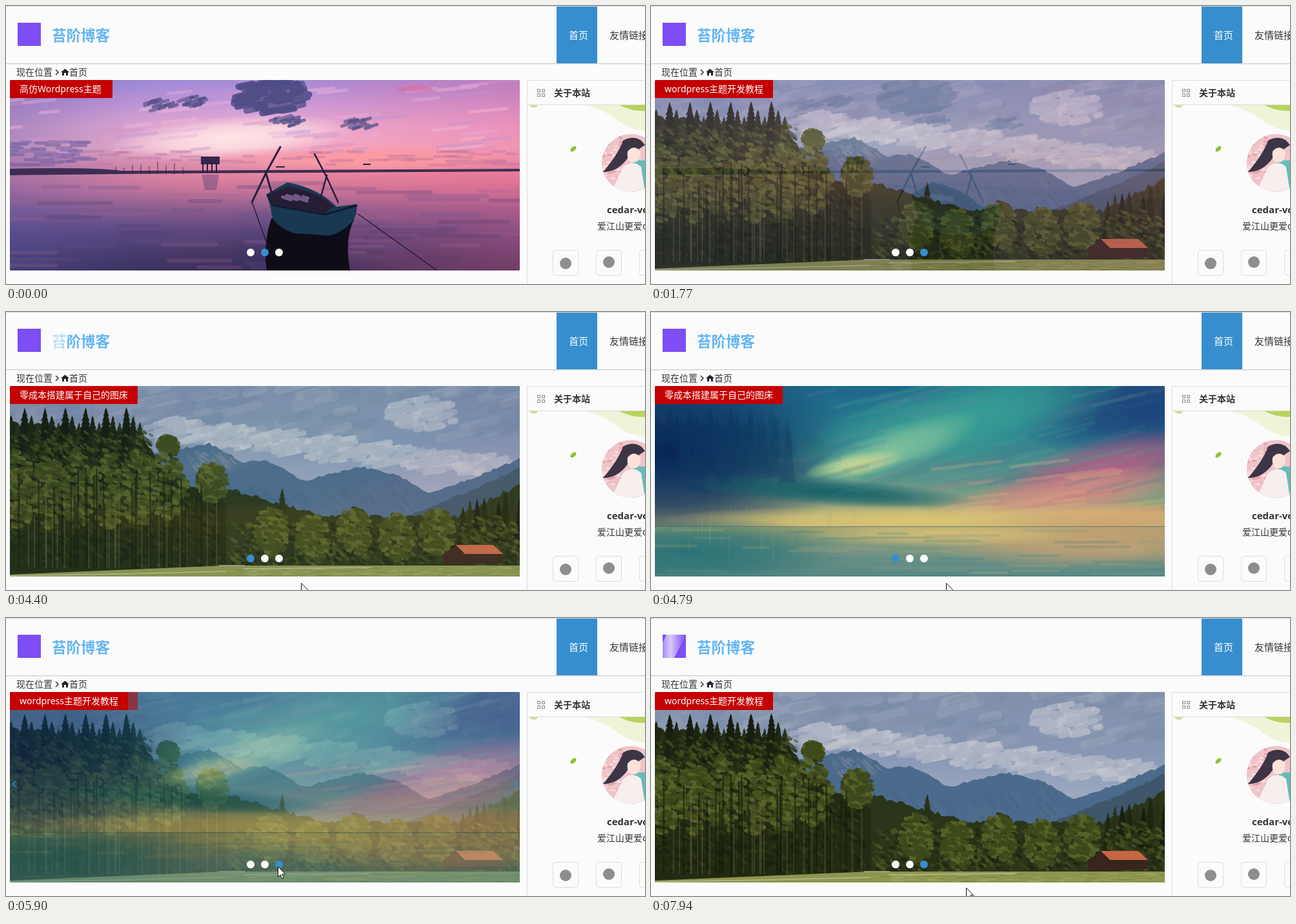
These frames come from a looping animation (990 by 432 pixels, 8000 ms). An HTML page:

```html
<!DOCTYPE html>
<html lang="zh-CN">
<head>
<meta charset="utf-8">
<title>博客首页</title>
<style>
html, body { margin: 0; width: 100%; height: 100%; overflow: hidden; background: #fbfbfb; }
svg { display: block; width: 100vw; height: 100vh; }
text { font: 14px "Noto Sans", "Noto Sans CJK SC", "Noto Sans CJK", sans-serif; fill: #333; }
</style>
</head>
<body>
<svg viewBox="0 0 990 432">
  <defs>
    <clipPath id="frame"><rect x="6" y="115" width="790" height="296" rx="2"/></clipPath>
    <clipPath id="brand"><rect x="15" y="26" width="146" height="36"/></clipPath>
    <clipPath id="face"><circle cx="968" cy="244" r="45"/></clipPath>
    <linearGradient id="gleam">
      <stop stop-color="#fff" stop-opacity="0"/>
      <stop offset=".5" stop-color="#fff" stop-opacity=".7"/>
      <stop offset="1" stop-color="#fff" stop-opacity="0"/>
    </linearGradient>
  </defs>
  <rect width="990" height="432" fill="#fbfbfb"/>
  <path d="M0 .5H990" stroke="#d9d9d9"/>
  <path d="M0 89.5H990" stroke="#cfcfcf"/>
  <path d="M0 90.5H990" stroke="#ececec"/>

  <g clip-path="url(#brand)">
    <rect x="18" y="26" width="36" height="36" fill="#7d4df5"/>
    <text x="71" y="53.5" style="font-size:22.5px;font-weight:700;fill:#62b5f5">苔阶博客</text>
    <path id="shine" d="M-24 62L-6 26H24L6 62Z" fill="url(#gleam)"/>
  </g>

  <rect x="853" y="1" width="63" height="88" fill="#368ecf"/>
  <text x="872" y="51" style="font-size:15px;fill:#fff">首页</text>
  <text x="935" y="51" style="font-size:15px">友情链接</text>

  <text x="16" y="108">现在位置</text>
  <path d="M77 99l4 4-4 4" fill="none" stroke="#333" stroke-width="1.5"/>
  <path d="M85 103l6.500-5.500 6.500 5.500h-2v5h-3v-4h-3v4h-3v-5z" fill="#1f2630"/>
  <text x="98" y="108">首页</text>

  <path d="M895 154Q925 160 945 176T990 194V154Z" fill="#eff4d8"/>
  <path d="M950 154Q970 164 990 163V154Z" fill="#b7d45c"/>
  <path d="M811 154h13q-2 5-7 4t-6-4z" fill="#cfe096"/>
  <ellipse cx="879" cy="222" rx="5.500" ry="3" transform="rotate(-42 879 222)" fill="#8cc42c"/>
  <path d="M990 115.500H807.500V432M808 153.500H990" fill="none" stroke="#dcdcdc"/>
  <text x="849" y="140" style="font-weight:700">关于本站</text>
  <g clip-path="url(#face)" id="avatar"></g>
  <text x="931" y="322" style="font-size:15px;font-weight:700">cedar-vole</text>
  <text x="916" y="347">爱江山更爱c</text>
  <g id="buttons"></g>

  <g clip-path="url(#frame)">
    <g id="boat"></g>
    <g id="hills"></g>
    <g id="aurora"></g>
    <g id="tags"></g>
    <path id="arrows" d="M15 254l-4 4 4 4M787 254l4 4-4 4" fill="none" stroke="#368ecf" stroke-width="1.600"/>
  </g>
  <g id="dots"></g>
  <path id="cursor" d="M.5.5v16l3.700-3.500 2.600 6 2.500-1.100-2.600-5.900h5.200z" fill="#fff" stroke="#111"/>
</svg>
<script>
const $ = id => document.getElementById(id);
let seed = 7;
const rnd = (a = 0, b = 1) => {
  seed = (seed * 16807) % 2147483647;
  return a + (b - a) * seed / 2147483647;
};
const many = (n, fn) => Array.from({ length: n }, (_, i) => fn(i)).join('');

// shapes
const path = (d, fill, o = 1) => `<path d="${d}" fill="${fill}" opacity="${o}"/>`;
const line = (d, stroke, w = 1, o = 1) =>
  `<path d="${d}" fill="none" stroke="${stroke}" stroke-width="${w}" opacity="${o}" stroke-linecap="round"/>`;
const stops = list => list.map((c, i) => `<stop offset="${i / (list.length - 1)}" stop-color="${c}"/>`).join('');
let gradients = 0;
const band = (y0, y1, colors, across = 0) => {
  const id = 'g' + gradients++;
  return `<linearGradient id="${id}" x2="${across}" y2="${1 - across}">${stops(colors)}</linearGradient>` +
    `<rect x="6" y="${y0}" width="790" height="${y1 - y0}" fill="url(#${id})"/>`;
};
const glow = (x, y, rx, ry, color, tilt = 0) => {
  const id = 'g' + gradients++;
  return `<radialGradient id="${id}">${stops([color, color + 'b0', color + '00'])}</radialGradient>` +
    `<ellipse rx="${rx}" ry="${ry}" fill="url(#${id})" transform="translate(${x} ${y}) rotate(${tilt})"/>`;
};

// brush strokes: a place to sample from, then n strokes in each colour
const box = (x0, x1, y0, y1) => () => [rnd(x0, x1), rnd(y0, y1)];
const disc = (x, y, rx, ry) => () => {
  const a = rnd(0, 6.283), d = Math.sqrt(rnd());
  return [x + rx * d * Math.cos(a), y + ry * d * Math.sin(a)];
};
const dabs = (place, n, len, w, colors, o = 1, tilt = 0) => colors.map(c => line(many(n, () => {
  const [x, y] = place(), l = len * rnd(.3, 1);
  return `M${x - l / 2} ${y}l${l} ${l * tilt}`;
}), c, w, o)).join('');

// a rough skyline through key points, filled to the bottom
const skyline = (points, fill, rough, step = 5) => {
  let d = `M${points[0][0]} 411`, k = 0;
  for (let x = points[0][0]; x <= points.at(-1)[0]; x += step) {
    while (k < points.length - 2 && x > points[k + 1][0]) k++;
    const [[xa, ya], [xb, yb]] = [points[k], points[k + 1]];
    d += `L${x} ${ya + (yb - ya) * (x - xa) / (xb - xa) + rnd(-rough, rough)}`;
  }
  return path(d + 'L796 ' + points.at(-1)[1] + 'V411Z', fill);
};
const fir = (x, top, h, w, fill) => path(`M${x} ${top}` + [1, -1].map(side => {
  const n = Math.round(h / 7);
  const edge = Array.from({ length: n }, (_, i) => {
    const u = (i + 1) / n, r = side * w * u ** .8;
    const tip = `L${x + r * rnd(.75, 1.15)} ${top + h * u}`, notch = `L${x + r * .6} ${top + h * u - 1}`;
    return side > 0 ? tip + notch : notch + tip;
  });
  return (side > 0 ? edge : edge.reverse()).join('');
}).join('') + 'Z', fill);

function drawBoat() {
  const dark = '#2a1f40', cloud = ['#5d568f', '#4c4a84'];
  const pole = 'M0 0L-22 40-44 86M-23 38L-12 76';
  return band(115, 254, ['#a18ddb', '#c59ada', '#e8acd4', '#f3b1ca', '#dc88a6']) +
    band(254, 411, ['#ef8ca2', '#c87699', '#885b8b', '#5a467c', '#433765', '#332c55']) +
    band(115, 411, ['#5d58a870', '#6a5fb020', '#ee6a9000', '#ee658c38', '#ee5f8858'], 1) +
    glow(350, 205, 190, 34, '#ffe6e6', -4) + glow(570, 238, 260, 24, '#ff9aa0') +
    dabs(box(6, 796, 118, 236), 18, 70, 5, ['#e0b0e2', '#f5bcd6', '#b994d4', '#d58fc0'], .4, -.1) +
    dabs(disc(410, 142, 52, 26), 45, 26, 10, cloud, .85, -.2) +
    [[291, 150], [238, 156], [548, 185], [434, 180]].map(([x, y]) =>
      dabs(disc(x, y, 23, 8), 9, 15, 5, cloud, .7, -.3)).join('') +
    dabs(disc(640, 129, 30, 4), 8, 30, 4, ['#e0699c'], .6) +
    dabs(box(6, 125, 210, 248), 22, 35, 5, ['#6d5b9b', '#7f68a8'], .55) +
    dabs(box(125, 796, 225, 248), 24, 45, 4, ['#b070a4', '#c4709c'], .4) +
    dabs(box(6, 796, 275, 408), 22, 130, 6, ['#a0638e', '#66508a', '#473a68'], .25) +
    path('M6 253Q130 250 180 256L796 253V257L290 260 6 263Z', '#3d2d55') +
    line(many(9, i => `M${170 + i * 13} ${rnd(240, 252)}V261`), dark, .8) +
    path('M302 234H331V246H302Z', '#32264c') + line(many(4, i => `M${305 + i * 7} 245V259`), dark, 2) +
    path('M303 262H330L326 286H308Z', '#6b4a7b', .5) +
    line('M419 250h12M554 246h10', dark, 2) +
    path('M404 411Q398 370 411 330H540Q524 360 533 411Z', '#0f0c18') +
    line('M545 323L668 411M381 304L408 380', '#1d1730', 1.300) +
    path('M404 292L436 274Q486 284 512 312L543 308Q548 340 502 357L446 353Q410 340 411 318Z', '#193852') +
    path('M407 293L437 280Q486 290 508 312L494 322 416 309Z', '#261c34') +
    dabs(disc(450, 299, 28, 5), 8, 18, 5, ['#77608f'], .9, .3) +
    line('M405 294L414 310 494 324 543 310', '#0f1b32', 3) +
    `<g transform="translate(425 219)">${line(pole, dark, 3)}</g>` +
    `<g transform="translate(478 230) scale(-.83 .87)">${line(pole, dark, 3)}</g>`;
}

function drawHills() {
  const leaf = ['#4b571f', '#59642a', '#3c471b'], pine = ['#1d2611', '#283117', '#171e0f'];
  const white = ['#b9bdca', '#c6c8d0', '#a9b1c3'];
  const tree = (x, y, w, h) => dabs(disc(x, y, w, h), 45, 7, 6, [pine[1], ...leaf], .9, .3);
  return band(115, 300, ['#8190ad', '#8696b3', '#a4afc4']) +
    dabs(box(6, 796, 115, 200), 32, 55, 13, ['#95a0b6', '#7889a6', '#a0a8bb', '#8290a9'], .5, -.25) +
    many(7, i => dabs(disc(265 + i * 80, 187 + i * 9, 45, 19), 24, 20, 8, white, .65, -.2)) +
    dabs(disc(645, 160, 55, 24), 26, 22, 9, white, .65, -.2) +
    skyline([[225, 222], [315, 204], [368, 234], [402, 230], [462, 262], [547, 240], [600, 251], [656, 281], [700, 267], [796, 228]], '#4c6a8b', 2) +
    dabs(disc(315, 228, 38, 14), 18, 10, 3, ['#7c8798', '#627a94'], .6, 1) +
    dabs(box(290, 640, 265, 320), 32, 24, 4, ['#3f617e', '#57728f'], .35, 1.200) +
    skyline([[612, 322], [735, 271], [796, 242]], '#3f566b', 2) +
    skyline([[325, 288], [346, 275], [500, 319], [700, 317], [796, 268]], '#2b351a', 4) +
    dabs(box(345, 796, 328, 392), 120, 6, 5, [...leaf, ...pine], .6, .6) +
    many(9, i => fir(708 + i * 11, 300 - i * 2.500 + rnd(-8, 8), 70, 13, pine[i % 3])) +
    fir(428, 273, 110, 20, pine[1]) +
    many(5, i => tree(412 + i * 64, 345 - 5 * Math.cos(i * 3), 25, 36)) +
    dabs(disc(750, 345, 45, 30), 40, 6, 5, [...leaf, pine[0]], .6, .5) +
    skyline([[6, 172], [210, 188], [238, 235], [292, 272], [345, 300]], '#222a12', 4).replace(/L796.*?V/, 'V') +
    many(20, i => fir(8 + i * 10.500, 160 + 13 * Math.sin(i * 2.100), 120, 25, pine[i % 3])) +
    dabs(box(6, 225, 185, 300), 150, 5, 4, [...leaf, ...pine], .6, .7) +
    dabs(box(6, 330, 290, 395), 130, 5, 5, ['#343c18', ...pine], .7, .7) +
    tree(251, 207, 14, 15) + tree(245, 270, 36, 52) + tree(319, 264, 22, 30) +
    many(5, i => tree(20 + i * 46, 275, 24, 62)) +
    line(many(26, () => `M${rnd(10, 330)} ${rnd(260, 320)}V397`), '#6a683f', 1.300, .55) +
    line(many(26, () => `M${rnd(10, 330)} ${rnd(240, 300)}V397`), '#14190b', 2.500, .6) +
    path('M6 408L340 394H796V411H6Z', '#8d954e') +
    dabs(box(340, 796, 397, 410), 30, 20, 1, ['#a8aa64', '#717b39', '#bcb97a'], .6) +
    line('M6 410L180 407 340 403M330 394H370M370 399L566 397', '#c4c3a3', 1.500, .8) +
    path('M677 376L698 362 711 377 769 375V390L678 394Z', '#38251c') +
    path('M697 362H755L770 376H711Z', '#c56645');
}

function drawAurora() {
  return band(115, 335, ['#19658a', '#267c8d', '#5c958a', '#c9b77a']) +
    glow(20, 220, 300, 160, '#07255c') + glow(770, 150, 220, 90, '#1b4078') +
    glow(480, 165, 270, 70, '#35a193', -14) + glow(370, 217, 150, 38, '#7fc19a', -20) +
    glow(318, 237, 80, 19, '#cbdc95', -10) + glow(280, 280, 230, 22, '#17636d', 4) +
    glow(700, 245, 190, 50, '#b05a82', -14) + glow(640, 285, 220, 36, '#d69580', -8) +
    dabs(box(250, 796, 122, 285), 20, 120, 6, ['#2f8e90', '#4fae98', '#2b6d8b', '#7b769a'], .15, -.25) +
    dabs(box(480, 796, 240, 312), 9, 120, 5, ['#e2ad83', '#c76e86', '#e0c07c'], .25, -.12) +
    `<g opacity=".35">${many(9, i => fir(52 + i * 20, rnd(148, 183), 100, 16, '#0c3b64'))}</g>` +
    glow(420, 325, 430, 26, '#e3cb78') + glow(720, 318, 170, 24, '#e2b078') +
    band(334, 411, ['#a5a673', '#78998a', '#548687']) +
    glow(60, 372, 250, 55, '#2b767b') + glow(680, 355, 270, 46, '#cba576') + glow(450, 345, 220, 20, '#d8c27a') +
    dabs(box(6, 796, 338, 408), 15, 120, 4, ['#3c8587', '#80998a', '#b5a678'], .25) +
    line(many(24, () => `M${rnd(50, 330)} ${rnd(300, 340)}v${rnd(20, 60)}`), '#8fae82', 1, .3) +
    line('M6 333.500H796', '#466f78', 1, .75);
}

const drawAvatar = () => path('M923 199h90v90h-90z', '#efc4c9') + path('M972 240h41v49h-48z', '#65bcb8') +
  dabs(box(925, 955, 202, 286), 25, 5, 3, ['#e58f9c', '#fbe9ea'], .7) +
  path('M925 258Q950 228 956 209 978 198 990 216L966 232Q950 258 925 258Z', '#3b3546') +
  path('M963 226q10-12 20 0 0 17-11 17t-9-17z', '#fbe3da') + path('M956 250Q972 238 984 250L990 289H938Z', '#f7eeee');

const tag = (id, w, label) => `<g id="${id}"><rect x="6" y="115" width="${w}" height="28" fill="#c40000"/>` +
  `<text x="21" y="134" style="fill:#fff">${label}</text></g>`;
const square = (x, y, size, rx) =>
  `<rect x="${x}" y="${y}" width="${size}" height="${size}" rx="${rx}" fill="none" stroke="${rx ? '#dcdcdc' : '#8a8a8a'}"/>`;

$('boat').innerHTML = drawBoat();
$('hills').innerHTML = drawHills();
$('aurora').innerHTML = drawAurora();
$('avatar').innerHTML = drawAvatar();
$('buttons').innerHTML = many(4, i => square(823.5 + i % 2 * 7, 129.5 + (i >> 1) * 7, 4, 0)) +
  many(3, i => square(847.5 + i * 67, 379.5, 39, 4)) +
  many(2, i => `<circle cx="${867 + i * 67}" cy="${400 - i * 2}" r="9" fill="#8e8e8e"/>`);
$('tags').innerHTML = tag('tagBoat', 159, '高仿Wordpress主题') +
  tag('tagAurora', 198, '零成本搭建属于自己的图床') + tag('tagHills', 183, 'wordpress主题开发教程');
$('dots').innerHTML = many(3, i => `<circle cx="${379 + i * 22}" cy="383" r="6"/>`);
const dots = [...$('dots').children];

const LOOP = 8000, FADE = 750, SWEEP = 960, GLIDE = 300;
const SWITCH = [1300, 4200, 5540];
// pointer stops: arrival time, x, y
const STOPS = [[2600, 500, 432], [2900, 457, 421], [5180, 421, 386], [6900, 488, 419]];
const clamp = v => Math.min(1, Math.max(0, v));
const ease = u => u < .5 ? 4 * u ** 3 : 1 - 4 * (1 - u) ** 3;
const ramp = (t, start, length) => ease(clamp((t - start) / length));
const set = (el, name, value) => {
  if (el.getAttribute(name) !== String(value)) el.setAttribute(name, value);
};
const show = (id, o) => set($(id), 'opacity', Number(o));

function render(t) {
  const [toHills, toAurora, back] = SWITCH.map(s => ramp(t, s, FADE));
  show('hills', toHills);
  show('aurora', toAurora * (1 - back));

  const step = SWITCH.filter(s => t >= s).length;
  const active = [1, 2, 0, 2][step];
  show('tagBoat', active === 1);
  show('tagHills', active === 2);
  show('tagAurora', step >= 2 ? 1 - back : 0);
  dots.forEach((dot, i) => set(dot, 'fill', i === active ? '#368ecf' : '#fff'));
  show('arrows', ramp(t, 5080, 200) - ramp(t, 6600, 200));

  const sweep = (t - 250 + SWEEP) % SWEEP;
  show('shine', t >= 250 && sweep < 580);
  set($('shine'), 'transform', `translate(${30 + 52 * (sweep / 315) ** 2} 0)`);

  const at = STOPS.reduce((p, [time, x, y]) => {
    const u = ramp(t, time - GLIDE, GLIDE);
    return [p[0] + (x - p[0]) * u, p[1] + (y - p[1]) * u];
  }, STOPS[0].slice(1));
  show('cursor', t >= STOPS[0][0]);
  set($('cursor'), 'transform', `translate(${at})`);
}

const begin = performance.now();
function tick() {
  render((performance.now() - begin) % LOOP);
  requestAnimationFrame(tick);
}
tick();
</script>
</body>
</html>
```
